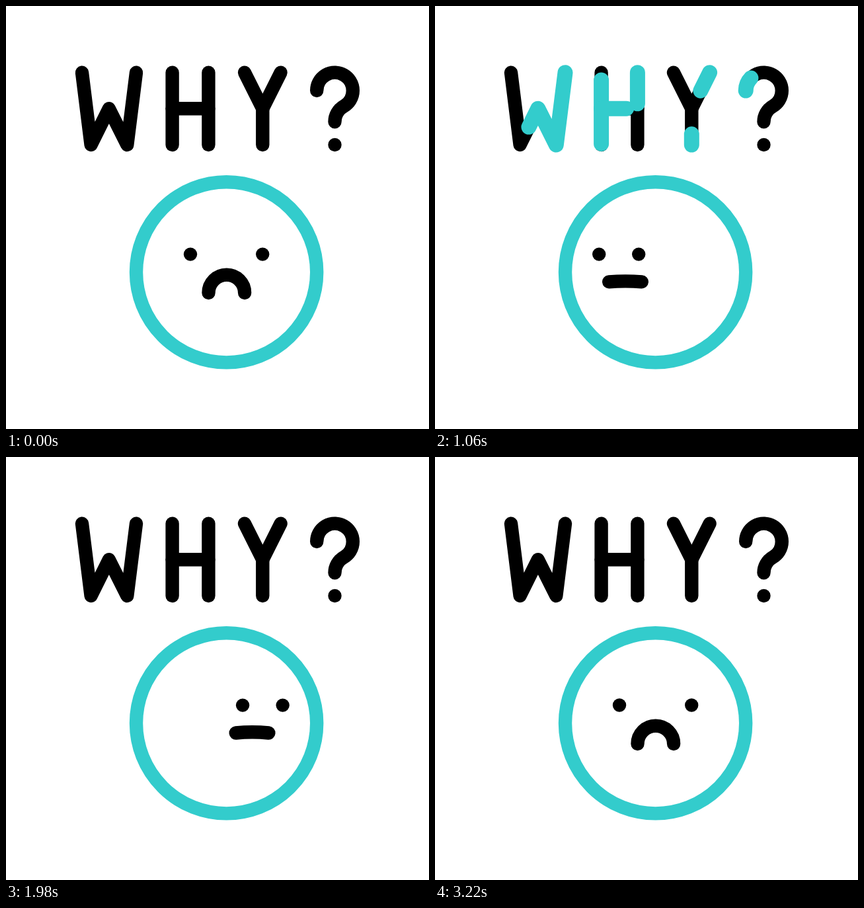
Write an HTML page that moves like this. It is 640 by 640 pixels and loops after 3.62 s.

```html
<!DOCTYPE html>
<html lang="en">
<head>
<meta charset="utf-8">
<title>Why?</title>
<style>
  html, body { margin: 0; width: 100%; height: 100%; overflow: hidden; background: #fff; }
  svg { display: block; width: 100%; height: 100%; }
  path { fill: none; stroke-width: 20.4; stroke-linecap: round; stroke-linejoin: round; stroke: #000; }
  #glow path { stroke: #3cc; stroke-width: 23; }
</style>
</head>
<body>
<svg viewBox="0 0 640 640">
  <g id="ink"></g>
  <g id="glow"></g>
  <circle cx="333.6" cy="402.8" r="136.6" fill="none" stroke="#3cc" stroke-width="20.4"/>
  <circle id="left" r="10.2"/>
  <circle id="right" r="10.2"/>
  <path id="mouth"/>
</svg>
<script>
const LOOP = 3620;
const $ = id => document.getElementById(id);
const clamp = v => Math.min(1, Math.max(0, v));
const mix = (a, b, p) => a + (b - a) * p;

// Symmetric ease-in-out: cubic-bezier(k, 0, 1 - k, 1)
function ease(u, k) {
  u = clamp(u);
  let lo = 0, hi = 1;
  for (let i = 0; i < 24; i++) {
    const s = (lo + hi) / 2, r = 1 - s;
    if (3 * r * r * s * k + 3 * r * s * s * (1 - k) + s * s * s < u) lo = s; else hi = s;
  }
  return lo * lo * (3 - 2 * lo);
}
const soft = (t, start, time) => ease((t - start) / time, 1 / 3);
const turn = (t, start) => ease((t - start) / 716, 0.66);

// Each stroke: path, time its head sets off, time its tail follows, duration
const strokes = [
  ["M115 100.7L128.6 210L155.8 155.2L183.3 210L197 100.7", 443, 827, 533],
  ["M251.6 210V100.7", 634, 1023, 533],
  ["M251.6 155.2H306.4", 724, 1120, 533],
  ["M306.4 100.7V210", 819, 1205, 533],
  ["M415.6 100.7L388.3 155.2", 835, 1266, 450],
  ["M388.3 210V155.2L361 100.7", 955, 1280, 450],
  ["M470.2 128a27.3 27.3 0 1 1 41 23.6c-8.5 4.9 -13.7 13.9 -13.7 23.7", 932, 1317, 533],
];

function addPath(parent, d) {
  const path = document.createElementNS("http://www.w3.org/2000/svg", "path");
  path.setAttribute("d", d);
  path.setAttribute("pathLength", 1);
  return $(parent).appendChild(path);
}
const DOT = "M497.5 210h.01";
for (const [d] of strokes) addPath("ink", d);
addPath("ink", DOT);
const trails = strokes.map(([d]) => addPath("glow", d));
const dotTrail = addPath("glow", DOT);

function drawLetters(t) {
  strokes.forEach(([, head, tail, time], i) => {
    const from = soft(t, tail, time), length = soft(t, head, time) - from;
    trails[i].style.display = length > 0.0005 ? "" : "none";
    trails[i].style.strokeDasharray = length + " 3";
    trails[i].style.strokeDashoffset = -from;
  });
  dotTrail.style.display = t >= 1400 && t < 1880 ? "" : "none";
}

function drawFace(t) {
  const a = turn(t, 210), b = turn(t, 1071), c = turn(t, 1899);
  const up = soft(t, 2685, 245) - soft(t, 2930, 295);
  const flat = a - c + up;

  const eyeX = 333.6 - 55.4 * a + 110.8 * b - 55.4 * c + 51 * up;
  const gap = mix(54.6, 30, flat), eyeY = 375.6 - 50 * up;
  [["left", -gap], ["right", gap]].forEach(([id, dx]) => {
    $(id).setAttribute("cx", eyeX + dx);
    $(id).setAttribute("cy", eyeY);
  });

  const x = 333.8 - 45.8 * a + 85 * b - 39.2 * c + 38 * up;
  const lift = 45 * up;
  const half = mix(27.3, 24.8, flat), bend = mix(15.1, 11, flat);
  const endY = mix(434, 417.3, flat) - lift;
  const sideY = mix(418.9, 416.7, flat) - lift;
  const topY = mix(406.7, 416.4, flat) - lift;
  const side = mix(27.3, 17, flat);
  $("mouth").setAttribute("d",
    `M${x - half} ${endY}C${x - side} ${sideY} ${x - bend} ${topY} ${x} ${topY}` +
    `S${x + side} ${sideY} ${x + half} ${endY}`);
}

const began = performance.now();
function frame() {
  const t = (performance.now() - began) % LOOP;
  drawLetters(t);
  drawFace(t);
  requestAnimationFrame(frame);
}
frame();
</script>
</body>
</html>
```
